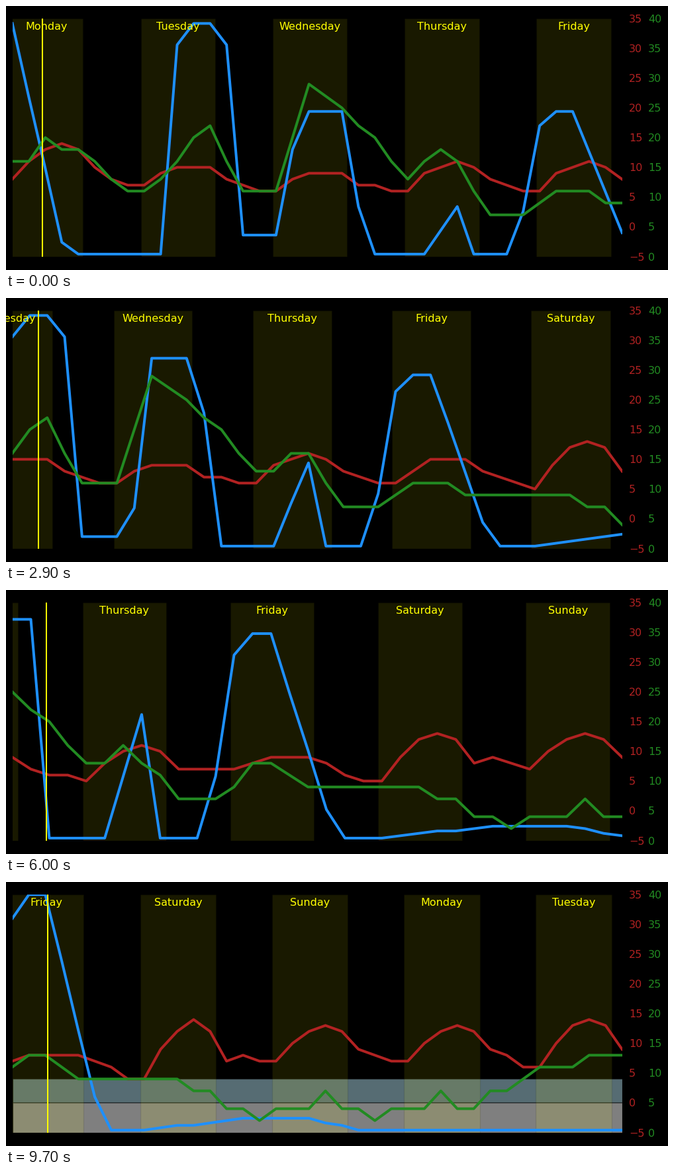
These frames come from a looping animation (1000x400 px, 9800 ms). A matplotlib script:

```python
import numpy as np
import matplotlib.pyplot as plt
from matplotlib.animation import FuncAnimation

WIDTH, HEIGHT, DPI = 1000, 400, 64
PX = 72 / DPI  # one pixel in points
FRAMES, INTERVAL = 98, 100
LEFT, BOTTOM, PLOT_W, PLOT_H = 9.6, 20.48, 921, 360.3
FIRST_HOUR = 11  # hours count from Monday midnight
DAYS = ["Monday", "Tuesday", "Wednesday", "Thursday", "Friday", "Saturday", "Sunday"]
FROST_LIMIT = 4
KNOT = 2.237  # mph per m/s, the wind's smallest step

# Daily lows and highs, as first and as last forecast
LOWS = [8, 7, 6, 6, 6, 6, 8, 7, 6], [8, 7, 7, 4.8, 7, 3.7, 7, 7, 6]
HIGHS = [14, 10, 9, 11, 11, 12, 13, 13, 14], [14, 10, 9, 11, 8, 14, 13, 13, 14]
WARMTH = [0.2, 0.05, 0, 0.55, 0.85, 1, 0.85, 0.35]  # share of the day's range, every 3 h

# Spells: start, peak from, peak to, end, then height as first and last forecast
SHOWERS = [(0, 6, 6, 15.5, 97, 97), (33, 36.3, 44.7, 48, 97, 97),
           (45, 48, 55, 57, 8, 3), (54, 57, 57, 60, 44, 0),
           (57, 60, 66, 69, 60, 92), (66, 69, 69, 72, 20, 92),
           (81, 87, 87, 90, 20, 60), (97.5, 102.5, 108, 118.5, 60, 99),
           (126, 144, 156, 166, 6, 4)]
GUSTS = [(9, 12, 12, 21, 4, 4), (30, 42, 42, 48, 11, 11), (54, 60, 61, 81, 18, 18),
         (75, 84, 87, 92, 6, 4), (99, 106.5, 106.5, 114, 4, 8)]
BREEZE = [(6, 16), (21, 16), (27, 11), (84, 11), (96, 6), (102, 7), (120, 10),
          (130, 10), (138, 6), (147, 3), (159, 6), (168, 3), (180, 6), (186, 5),
          (195, 9), (201, 12), (213, 13)]


def mix(a, b, share):
    return a + (b - a) * share


def window(frame):
    """First and last hour on show; the last is 21:00 four days on."""
    hour = FIRST_HOUR + frame
    lag = 2 if hour % 24 in (2, 3) else 3.5
    start = int((hour - lag) // 3) * 3
    return start, (start // 24 + 4) * 24 + 21


def strongest(spells, frame, hours):
    """Highest spell at each hour; its height settles as it draws near."""
    result = np.zeros(len(hours))
    for start, peak, fade, end, first, last in spells:
        nearness = np.clip(frame / max(peak - FIRST_HOUR, 1), 0, 1)
        shape = np.interp(hours, [start, peak, fade, end], [0, 1, 1, 0])
        result = np.maximum(result, mix(first, last, nearness) * shape)
    return result


def temperature(frame, hours):
    share = frame / (FRAMES - 1)
    low = mix(*np.array(LOWS), share)[hours // 24]
    high = mix(*np.array(HIGHS), share)[hours // 24]
    return np.round(mix(low, high, np.array(WARMTH)[hours % 24 // 3]))


def wind(frame, hours):
    speed = np.interp(hours, *zip(*BREEZE)) + strongest(GUSTS, frame, hours)
    return np.round(KNOT * np.round(speed / KNOT))


def rain(frame, hours):
    return np.round(1 + strongest(SHOWERS, frame, hours))


plt.rcParams["font.family"] = "DejaVu Sans"
plt.rcParams["font.size"] = 16 * PX

fig = plt.figure(figsize=(WIDTH / DPI, HEIGHT / DPI), dpi=DPI, facecolor="black")
ax = fig.add_axes([LEFT / WIDTH, BOTTOM / HEIGHT, PLOT_W / WIDTH, PLOT_H / HEIGHT])
ax.axis("off")
ax.set_ylim(0, 40)

edge = dict(edgecolor="black", linewidth=1.33 * PX)
frost = [ax.axhspan(0, 5, facecolor="white", alpha=0.5, **edge),
         ax.axhspan(5, 5 + FROST_LIMIT, facecolor="lightblue", alpha=0.5, **edge)]

for day in range(9):
    sunrise = 24 * day + 5.52 - 0.032 * day
    sunset = 24 * day + 18.87 + 0.03 * day
    ax.axvspan(sunrise, sunset, facecolor="yellow", alpha=0.1, **edge)
    ax.annotate(DAYS[day % 7], ((sunrise + sunset) / 2, 38.14),
                color="yellow", ha="center", annotation_clip=True)

for level in range(0, 41, 5):
    y = (BOTTOM + PLOT_H * level / 40) / HEIGHT
    degrees = str(level - 5).replace("-", "\N{MINUS SIGN}")
    fig.text(0.941, y, degrees, color="firebrick", va="center_baseline")
    fig.text(0.970, y, str(level), color="forestgreen", va="center_baseline")


def series(color):
    return ax.plot([], [], color=color, linewidth=4 * PX)[0]


temp_line = series("firebrick")
rain_line = series("dodgerblue")
wind_line = series("forestgreen")
now_line = ax.axvline(0, color="yellow", linewidth=2 * PX)


def update(frame):
    start, end = window(frame)
    hours = np.arange(start, end + 1, 3)
    temp = temperature(frame, hours)
    temp_line.set_data(hours, temp + 5)
    rain_line.set_data(hours, rain(frame, hours) * 0.4)
    wind_line.set_data(hours, wind(frame, hours))
    for area in frost:
        area.set_visible(temp.min() <= FROST_LIMIT)
    now = FIRST_HOUR + 0.49 + frame
    now_line.set_xdata([now, now])
    ax.set_xlim(start, end)
    return []


anim = FuncAnimation(fig, update, frames=FRAMES, interval=INTERVAL,
                     init_func=lambda: update(0), repeat=True, repeat_delay=0)
plt.show()
```
